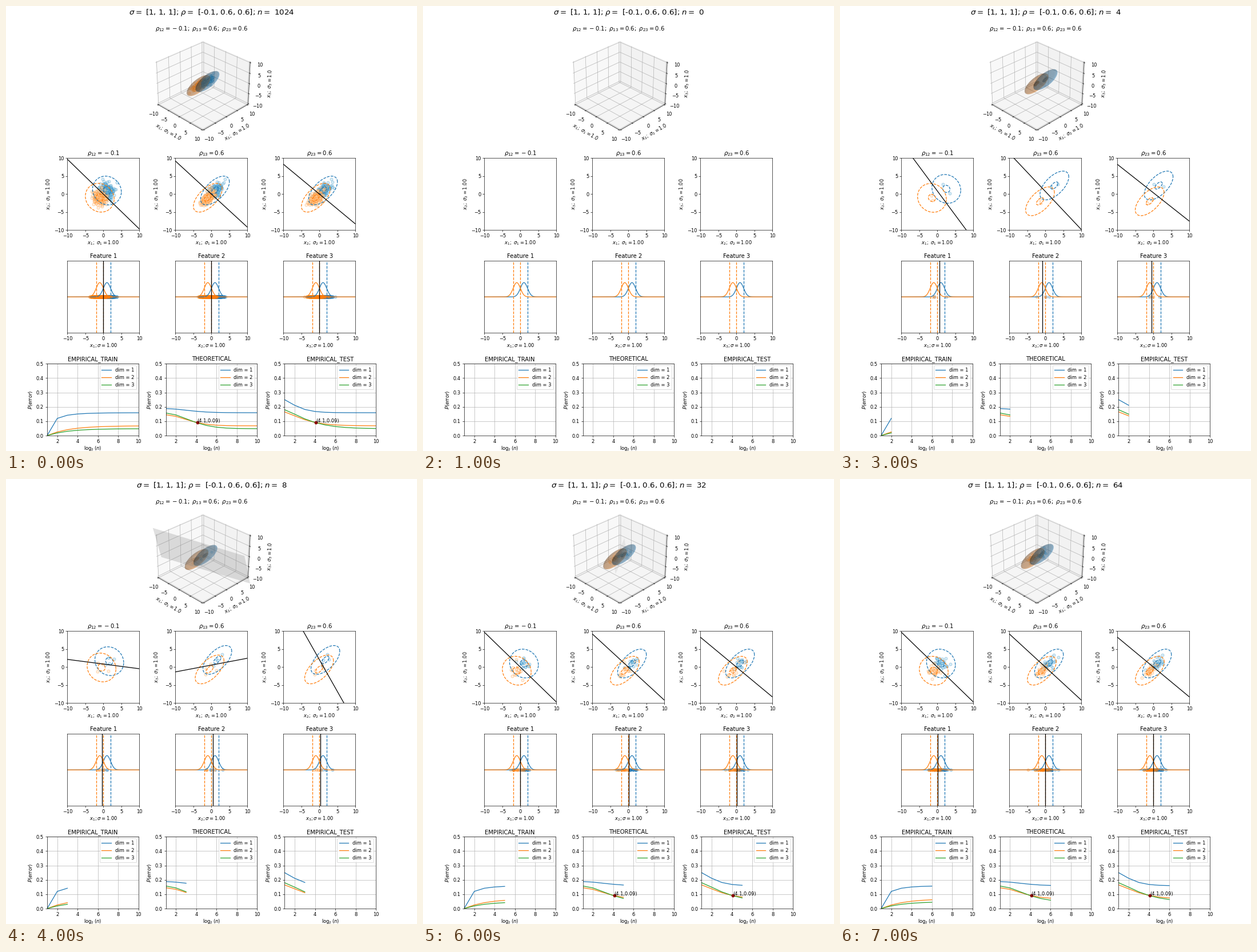
Recreate the animation shown at these times as a matplotlib script. Size 719 px wide and 779 px high, loop 8000 ms.

```python
import numpy as np
import matplotlib.pyplot as plt
from matplotlib.animation import FuncAnimation
from mpl_toolkits.mplot3d.art3d import Poly3DCollection

W, H, DPI = 719, 779, 60
BLUE, ORANGE, GREEN = "tab:blue", "tab:orange", "tab:green"
PALE = {BLUE: "skyblue", ORANGE: "#ffd9ad"}
CLASSES = ((BLUE, 1), (ORANGE, -1))
COV = np.array([[1, -0.1, 0.6], [-0.1, 1, 0.6], [0.6, 0.6, 1]])
ROOT = np.linalg.cholesky(COV)
PAIRS = [(0, 1), (0, 2), (1, 2)]
TICKS = range(-10, 11, 5)
SIZES = [1024, 0] + [2 ** k for k in range(1, 7)]
MAX_POINTS = 200

# Small samples miss the true centres: blue centre, orange centre, boundary slopes.
ESTIMATES = {
    4: ((2.5, 1.45, 2.4), (-1.5, -1.05, -2), (-1.35, -1.06, -0.79)),
    8: ((1.65, 1.65, 2), (-0.5, -0.1, -0.65), (-0.13, 0.19, -1.77)),
    16: ((1, 1, 1), (-0.55, -1.45, -1), (-1.53, -0.93, -1.03)),
}
SETTLED = ((1, 1, 1), (-1, -1, -1), (-0.97, -0.92, -0.83))

# Error at large n per dimension; then start, scale and power of each approach.
FINAL_ERROR = (0.159, 0.068, 0.048)
APPROACH = {
    "EMPIRICAL_TRAIN": ((0, 0, 0), (0.61, 2.16, 2.05), (0.67, 1, 1)),
    "THEORETICAL": ((0.188, 0.145, 0.157), (2.9, 2.75, 3.1), (1.8, 1.8, 1.8)),
    "EMPIRICAL_TEST": ((0.25, 0.165, 0.18), (1.55, 2.3, 2.75), (1.3, 1.3, 1.3)),
}

# The small offset keeps the pixel size from rounding down.
fig = plt.figure(figsize=((W + 0.01) / DPI, (H + 0.01) / DPI), dpi=DPI)


def place(left, bottom, width, height, **kw):
    """Add axes from pixel bounds, with bottom measured from the top."""
    return fig.add_axes([left / W, 1 - bottom / H, width / W, height / H], **kw)


def label(x, y, text, size):
    return fig.text(x / W, 1 - y / H, text, size=size, ha="center", va="baseline")


def rho(i, j):
    value = r"\hspace{0.2}{-}\hspace{0.2}0.1" if (i, j) == (0, 1) else "0.6"
    return rf"\rho_{{{i + 1}{j + 1}}}={value}"


def axis_name(i, value):
    return rf"$x_{i + 1};\ \sigma_{i + 1}={value}$"


heading = label(359.5, 15, "", 16)
label(341.5, 43.3, "$" + r";\ ".join(rho(*p) for p in PAIRS) + "$", 12)

cube = place(253, 227.1, 178, 178, projection="3d")
cube.view_init(elev=30, azim=-45)
LIM = 10 * 25 / 24
cube.set(xlim=(-LIM, LIM), ylim=(-LIM, LIM), zlim=(-LIM, LIM),
         xticks=TICKS, yticks=TICKS, zticks=TICKS,
         xlabel=axis_name(0, "1.0"), ylabel=axis_name(1, "1.0"),
         zlabel=axis_name(2, "1.0"))

X_PAD = 1.8
flats, rows, plots = [], [], []
grid = np.linspace(-10, 10, 400)
for k, (i, j) in enumerate(PAIRS):
    left = 107.4 + 189 * k
    ax = place(left, 392.2, 125.8, 125.8)
    ax.set(xlim=(-10, 10), ylim=(-10, 10), xticks=TICKS, yticks=TICKS,
           ylabel=axis_name(j, "1.00"), title=f"${rho(i, j)}$")
    ax.set_xlabel(axis_name(i, "1.00"), labelpad=X_PAD)
    flats.append(ax)

    ax = place(left, 572.2, 125.8, 125.8)
    ax.set(xlim=(-10, 10), ylim=(-1, 1), xticks=TICKS, yticks=[],
           title=f"Feature {k + 1}")
    ax.set_xlabel(rf"$x_{k + 1};\sigma=1.00$", labelpad=X_PAD)
    for color, mu in CLASSES:
        ax.plot(grid, np.exp(-(grid - mu) ** 2 / 2) / np.sqrt(2 * np.pi), color=color)
        ax.axvline(2 * mu, color=color, ls="--")
    ax.axvline(0, color=ORANGE, ls="--")
    rows.append(ax)

steps = np.arange(1, 11)
for k, (title, params) in enumerate(APPROACH.items()):
    ax = place(71.9 + 207.7 * k, 752, 159.8, 125.8)
    ax.set(xlim=(1, 10), ylim=(0, 0.5), xticks=range(2, 11, 2),
           yticks=np.arange(6) / 10, title=title, ylabel="$P(error)$")
    ax.set_xlabel(r"$\log_2(n)$", labelpad=X_PAD)
    ax.grid(True)
    curves = []
    for d, (end, start, scale, power) in enumerate(zip(FINAL_ERROR, *params)):
        fade = np.exp(-((steps - 1) / scale) ** power)
        line, = ax.plot([], [], color=(BLUE, ORANGE, GREEN)[d], label=f"dim = {d + 1}")
        curves.append((line, end + (start - end) * fade))
    ax.legend(loc="upper right", bbox_to_anchor=(0, 0, 1, 1.008))
    plots.append((ax, curves))

angle = np.linspace(0, 2 * np.pi, 121)
circle = np.array([np.cos(angle), np.sin(angle)])
u, v = np.meshgrid(np.linspace(0, 2 * np.pi, 31), np.linspace(0, np.pi, 21))
sphere = np.array([np.cos(u) * np.sin(v), np.sin(u) * np.sin(v), np.cos(v)])
live = []


def cloud(rng, mean, n):
    """Correlated points whose average is exactly the given mean."""
    pts = rng.standard_normal((min(n // 2, MAX_POINTS), 3)) @ ROOT.T
    return pts - pts.mean(axis=0) + mean


def drift(k):
    """Sampling error that swings from side to side and dies out."""
    return np.clip(0.9 * (-0.5) ** (k - 2), -1, 1)


def draw_plane(k):
    # Half diagonals on screen: wide at first, then a sliver seen edge-on.
    q = 0.27 ** (k - 4)
    a = np.array([15 - 27 * q, 30 + 5 * q])
    b = np.array([6 + 18 * q, 14 - 3.5 * q])
    quad = [(x / 7.774, x / 7.774, y / 3.571) for x, y in (a, b, -a, -b)]
    gray = (0.5, 0.5, 0.5, min(0.1 + 0.1 * q, 0.25))
    plane = Poly3DCollection([quad], facecolors=[gray], linewidths=0)
    cube.add_collection3d(plane)
    live.append(plane)


def draw_cube(rng, n):
    k = np.log2(n)
    for color, mu in CLASSES:
        mean = np.full(3, mu + drift(k))
        for radius in (1, 4):
            shell = np.tensordot(ROOT, sphere, 1) * radius + mean[:, None, None]
            live.append(cube.plot_surface(*shell, color=color, alpha=0.28,
                                          rstride=1, cstride=1, linewidth=0))
        live.append(cube.scatter(*cloud(rng, mean, n).T, s=20, color=PALE[color],
                                 edgecolor=color, alpha=0.3))
    if k >= 3:
        draw_plane(k)


def draw_flats(rng, n):
    *means, slopes = ESTIMATES.get(n, SETTLED)
    for (color, _), mean in zip(CLASSES, means):
        pts = cloud(rng, mean, n)
        for ax, (i, j) in zip(flats, PAIRS):
            live.append(ax.scatter(pts[:, i], pts[:, j], s=36, color=PALE[color],
                                   edgecolor=color, alpha=0.35))
            root = np.linalg.cholesky(COV[np.ix_([i, j], [i, j])])
            for radius in (1, 4):
                x, y = radius * root @ circle
                live.extend(ax.plot(x + mean[i], y + mean[j], "--", color=color))
    middle = np.mean(means, axis=0)
    for ax, (i, j), slope in zip(flats, PAIRS, slopes):
        y = middle[j] + slope * (grid[[0, -1]] - middle[i])
        live.extend(ax.plot(grid[[0, -1]], y, color="black"))


def draw_rows(rng, n):
    for color, mu in CLASSES:
        for ax in rows:
            xs = rng.normal(mu, 1, n // 2)
            live.append(ax.scatter(xs, 0 * xs, s=36, color=color, alpha=0.3))
    for ax, weight in zip(rows, (0.7, -1, -0.6)):
        live.append(ax.axvline(weight * drift(np.log2(n)), color="black"))


def draw_plots(n):
    count = int(np.log2(n)) if n else 0
    for ax, curves in plots:
        for line, curve in curves:
            line.set_data(steps[:count], curve[:count])
    if count >= 5:
        for ax, _ in plots[1:]:
            live.extend(ax.plot(4.1, 0.09, "o", color="darkred"))
            live.append(ax.text(4.1, 0.09, "(4.1,0.09)"))


def update(frame):
    while live:
        live.pop().remove()
    n = SIZES[frame]
    heading.set_text(rf"$\sigma=$ [1, 1, 1]; $\rho=$ [-0.1, 0.6, 0.6]; $n=$ {n}")
    draw_plots(n)
    if n:
        rng = np.random.default_rng(n)
        for draw in (draw_cube, draw_flats, draw_rows):
            draw(rng, n)
    return []


anim = FuncAnimation(fig, update, frames=len(SIZES), init_func=lambda: [],
                     interval=1000, repeat=True, repeat_delay=0, blit=False)
plt.show()
```
